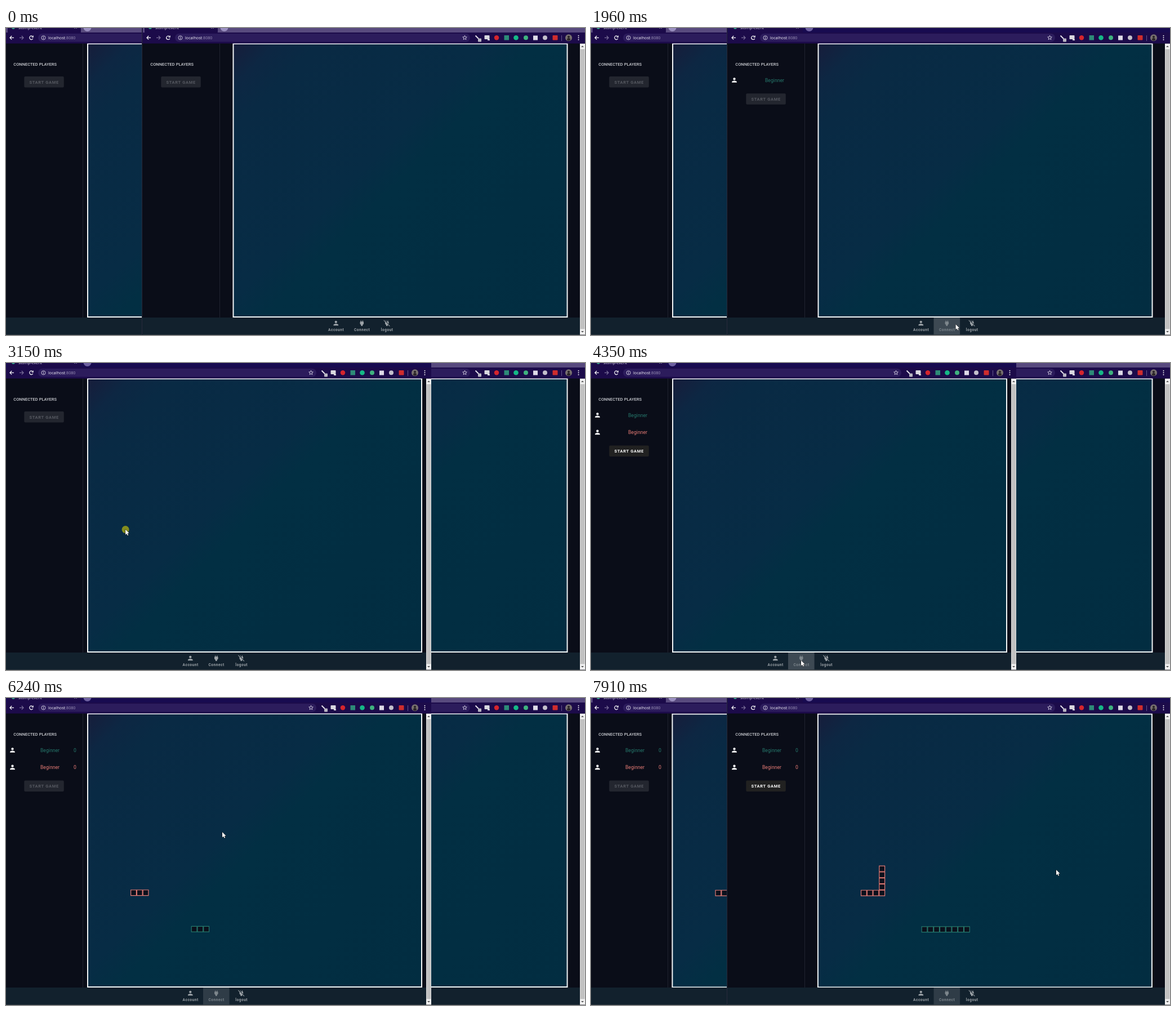
These frames come from a looping animation (1028 px wide and 545 px high, 7.99 s). An HTML page with a canvas:

```html
<!DOCTYPE html>
<html lang="en">
<head>
<meta charset="utf-8">
<title>Two player snake</title>
<style>
html, body { margin: 0; width: 100%; height: 100%; overflow: hidden; background: #0a0d18; }
canvas { display: block; }
</style>
</head>
<body>
<canvas id="stage" width="1028" height="545"></canvas>
<script>
const ctx = document.getElementById('stage').getContext('2d');
const LOOP = 7990;
const UI = 'Roboto, sans-serif';
const GREEN = '#26786c', RED = '#e57b75';
const CELL = 10.76;

const T = {
  focusRight: 430, joinRight: 1640, focusLeft: 3070, joinLeft: 4110,
  start: 5600, play: 5760, reflow: 6750, refocus: 7630
};

// Pointer path: time, x, y of the tip
const PATH = [
  [70, 1022, 330], [430, 760, 345], [550, 755, 347], [870, 676, 391], [1340, 647, 526],
  [1960, 647.5, 526], [2600, 358, 287], [2750, 356, 287], [3070, 212, 295], [3470, 213, 300],
  [3900, 373, 528], [4350, 373, 528], [4480, 394, 440], [4740, 295, 222], [4890, 294, 222],
  [5440, 72, 153], [5690, 72, 153], [5920, 369, 226], [6080, 371, 226], [6240, 384, 238],
  [6400, 384, 238], [6550, 401, 240], [6710, 403, 240], [7430, 823, 287], [7510, 839, 288],
  [7680, 839, 288], [7910, 826, 305], [7990, 826, 305]
];
const CLICKS = [430, 1570, 3070, 3950, 5500, 7560];

const ICONS = {
  person: new Path2D('M12 4a4 4 0 0 1 0 8a4 4 0 0 1 0-8m0 10c4.42 0 8 1.79 8 4v2H4v-2c0-2.21 3.58-4 8-4z'),
  plug: new Path2D('M16 7V3h-2v4h-4V3H8v4C7 7 6 8 6 9v5.5L9.5 18v3h5v-3l3.5-3.5V9c0-1-1-2-2-2z'),
  unplug: new Path2D('M20.84 22.73L15.31 17.2 14.5 18v3h-5v-3L6 14.5V9c0-.3.1-.61.25-.91L1.11 3l1.28-1.27 19.73 19.73zM18 14.5V9c0-1-1-2-2-2V3h-2v4h-3.8l7.6 7.6zM10 3H8v1.8l2 2z')
};
const ARROW = new Path2D('M0 0V9.4L2.2 7.4 3.7 10.8 5.2 10.1 3.7 6.8H6.7z');

function rect(x, y, w, h, color) {
  ctx.fillStyle = color;
  ctx.fillRect(x, y, w, h);
}

function pill(x, y, w, h, r, color) {
  ctx.fillStyle = color;
  ctx.beginPath();
  ctx.roundRect(x, y, w, h, r);
  ctx.fill();
}

function disc(x, y, r, color) {
  ctx.fillStyle = color;
  ctx.beginPath();
  ctx.arc(x, y, r, 0, 7);
  ctx.fill();
}

function line(points, color, width = 1.2) {
  ctx.strokeStyle = color;
  ctx.lineWidth = width;
  ctx.beginPath();
  points.forEach(([x, y]) => ctx.lineTo(x, y));
  ctx.stroke();
}

function text(str, x, y, font, color, { align = 'left', gap = 0 } = {}) {
  ctx.font = font;
  ctx.fillStyle = color;
  ctx.textAlign = align;
  ctx.textBaseline = 'alphabetic';
  ctx.letterSpacing = gap + 'px';
  ctx.fillText(str, x, y);
}

function icon(name, x, y, color, size = 13) {
  ctx.save();
  ctx.translate(x - size / 2, y - size / 2);
  ctx.scale(size / 24, size / 24);
  ctx.fillStyle = color;
  ctx.fill(ICONS[name]);
  ctx.restore();
}

function arrow(x, y, dir, color) {
  line([[x - 3.5, y], [x + 3.5, y]], color);
  line([[x + dir * .3, y - 3.3], [x + dir * 3.5, y], [x + dir * .3, y + 3.3]], color);
}

function star(x, y) {
  const pts = [];
  for (let i = 0; i <= 10; i++) {
    const a = i * Math.PI / 5 - Math.PI / 2, r = i % 2 ? 1.8 : 4;
    pts.push([x + r * Math.cos(a), y + r * Math.sin(a)]);
  }
  line(pts, '#d8d4e6', .9);
}

function tabStrip(x, right, focused) {
  rect(x, 0, right - x, 8, focused ? '#180b50' : '#584a7e');
  pill(x + 3, -8, 130, 18, 4, '#1c0b4a');
  disc(x + 13, -1, 3, '#35a58c');
  text('stomp-client', x + 22, 1.6, '7.2px "Open Sans", sans-serif', '#e4e1ee');
  line([[x + 121.5, -3], [x + 125.5, 1]], '#c8c3da', 1);
  line([[x + 125.5, -3], [x + 121.5, 1]], '#c8c3da', 1);
  disc(x + 144.5, -1, 7, focused ? '#6d60a0' : '#9a8fc0');
}

function toolbar(x, right) {
  rect(x, 8, right - x, 19.5, '#1c0b4a');
  arrow(x + 10.5, 17.3, -1, '#fff');
  arrow(x + 27.5, 17.3, 1, '#7d729c');
  ctx.strokeStyle = '#fff';
  ctx.lineWidth = 1.2;
  ctx.beginPath();
  ctx.arc(x + 45, 17.3, 3.2, .5, 5.4);
  ctx.stroke();
  line([[x + 45.5, 16.2], [x + 48.2, 16.2], [x + 48.2, 13.4]], '#fff');

  pill(x + 57, 10, right - x - 261, 14.5, 7.2, '#2c1c5c');
  ctx.strokeStyle = '#dcd8e8';
  ctx.lineWidth = .9;
  ctx.beginPath();
  ctx.arc(x + 66.5, 17.3, 3.5, 0, 7);
  ctx.stroke();
  rect(x + 66, 16.7, 1, 2.7, '#dcd8e8');
  rect(x + 66, 15, 1, 1, '#dcd8e8');
  const font = '7.2px "Open Sans", sans-serif';
  text('localhost', x + 75, 20, font, '#f4f2fa');
  text(':8080', x + 75 + ctx.measureText('localhost').width, 20, font, '#9c93b8');

  star(right - 213.5, 17.3);
  line([[right - 194.5, 13.5], [right - 189, 19]], '#e8e6ee', 1.8);
  pill(right - 190, 18.5, 6, 6, 1, '#b9b7c2');
  pill(right - 178.5, 13, 9, 7, 1, '#d9d8e0');
  rect(right - 173, 20, 4, 2, '#d9d8e0');
  disc(right - 157, 17.3, 4.2, '#d5252d');
  pill(right - 143.5, 13, 8.5, 8.5, 0, '#2d8b78');
  disc(right - 122.5, 17.3, 4.3, '#15b886');
  disc(right - 105, 17.3, 4, '#3fb27f');
  pill(right - 92, 13.5, 8, 8, 0, '#dedbe8');
  disc(right - 71, 17.3, 4, '#c4c0cc');
  pill(right - 57.5, 13, 9, 8.5, 1, '#cf2d2d');
  rect(right - 42, 13, 1, 10, '#65588c');
  disc(right - 29, 17.3, 6, '#77706f');
  disc(right - 29, 15.8, 2.1, '#2b2529');
  pill(right - 32, 18, 6, 4.5, 2.5, '#2b2529');
  [13.8, 17.3, 20.8].forEach(y => disc(right - 11.5, y, .95, '#fff'));
}

function scrollbar(x) {
  rect(x, 27.5, 9, 517, '#f1f1f1');
  rect(x + .6, 37.5, 7.8, 497, '#c1c1c1');
  [[33, 1], [539, -1]].forEach(([y, d]) => {
    ctx.fillStyle = '#505050';
    ctx.beginPath();
    ctx.moveTo(x + 4.5, y - d * 1.5);
    ctx.lineTo(x + 7, y + d);
    ctx.lineTo(x + 2, y + d);
    ctx.fill();
  });
}

function sidebar(x, s) {
  rect(x + 136, 27.5, 1, 487, '#20232f');
  text('CONNECTED PLAYERS', x + 13.3, 67, '500 7.5px ' + UI, '#c9cbd0');
  [GREEN, RED].slice(0, s.players).forEach((color, i) => {
    const y = 92.5 + 30.4 * i;
    icon('person', x + 11.5, y, '#fff');
    text('Beginner', x + (s.playing ? 61 : 66), y + 3.2, '8.64px ' + UI, color);
    if (s.playing) text('0', x + 120, y + 3.2, '8.64px ' + UI, color);
  });
  const y = 86 + 30.3 * s.players;
  pill(x + 32.3, y, 70.5, 19.4, 2, s.ready ? '#212121' : '#23262f');
  text('START GAME', x + 41.5, y + 12.5, '700 7.45px ' + UI, s.ready ? '#fff' : '#575a62', { gap: .68 });
}

function cellAt(col, row, color) {
  ctx.fillStyle = '#0b101c';
  ctx.strokeStyle = color;
  ctx.lineWidth = 1.2;
  ctx.beginPath();
  ctx.rect(col * CELL + .5, row * CELL + .5, 9.8, 9.8);
  ctx.fill();
  ctx.stroke();
}

function board(x, t) {
  const moved = t >= T.reflow;
  ctx.save();
  ctx.translate(x - (moved ? .6 : 0), moved ? 28.5 : 28);
  // 45 degree blend across a 593 x 485 box
  const g = ctx.createLinearGradient(0, 0, 539, 539);
  g.addColorStop(0, '#171d3b');
  g.addColorStop(.07, '#0d2743');
  g.addColorStop(.14, '#092a44');
  g.addColorStop(.42, '#072c45');
  g.addColorStop(.5, '#022f43');
  g.addColorStop(1, '#022d41');
  ctx.fillStyle = g;
  ctx.fillRect(0, 0, 593, 485);
  ctx.strokeStyle = '#f4f6f7';
  ctx.lineWidth = 2;
  ctx.strokeRect(0, 0, 593, 485);
  if (t >= T.play) {
    ctx.translate(.8, .2);
    const count = 1 + Math.floor((t - 5530) / 315);
    for (let i = 0; i < count; i++) {
      cellAt(7 + Math.min(i, 3), 29 - Math.max(i - 3, 0), RED);
      cellAt(17 + i, 35, GREEN);
    }
  }
  ctx.restore();
}

function footer(x, right, mid, glow) {
  rect(x, 514, right - x, 31, '#12212d');
  rect(x, 544, right - x, 1, '#2a343c');
  if (glow) rect(mid - 23.3, 514, 46.6, 30, `rgba(255,255,255,${glow})`);
  [['person', 'Account', -46], ['plug', 'Connect', 0], ['unplug', 'logout', 44.5]].forEach(([name, label, dx], i) => {
    const color = i === 1 && glow ? '#7d868c' : '#9da3a8';
    icon(name, mid + dx, 524, color);
    text(label, mid + dx + .3, 538.3, '700 6.5px ' + UI, color, { align: 'center', gap: .55 });
  });
}

function browser(s, t) {
  const { x, right, mid } = s;
  rect(x, 0, right - x, 545, '#0a0d18');
  sidebar(x, s);
  board(mid - 228.3, t);
  footer(x, right - 9, mid, s.glow);
  scrollbar(right - 9);
  tabStrip(x, right, s.focused);
  toolbar(x, right);
}

function pointerAt(t) {
  const i = PATH.findIndex(p => p[0] > t);
  if (i < 1) return null;
  const [t0, x0, y0] = PATH[i - 1], [t1, x1, y1] = PATH[i];
  const u = (t - t0) / (t1 - t0), k = u * u * (3 - 2 * u);
  return [x0 + (x1 - x0) * k, y0 + (y1 - y0) * k];
}

function pointer(p, t) {
  if (!p) return;
  if (CLICKS.some(c => t >= c && t < c + 160)) disc(p[0], p[1], 6.5, 'rgba(222,212,0,.58)');
  ctx.save();
  ctx.translate(...p);
  ctx.strokeStyle = '#000';
  ctx.lineWidth = 1;
  ctx.stroke(ARROW);
  ctx.fillStyle = '#fff';
  ctx.fill(ARROW);
  ctx.restore();
}

function draw(t) {
  const p = pointerAt(t);
  const leftOnTop = t >= T.focusLeft && t < T.refocus;
  const playing = t >= T.play;
  const glowFor = (mid, active, used) => {
    const over = active && p && p[1] > 514 && Math.abs(p[0] - mid) < 23.3;
    return (used ? .12 : 0) + (over ? (used ? .06 : .04) : 0);
  };
  const left = {
    x: 0, right: 755, mid: 373.3, playing, focused: leftOnTop,
    players: t >= T.joinLeft ? 2 : 0,
    ready: t >= T.joinLeft && t < T.start,
    glow: glowFor(373.3, leftOnTop, t >= 3950)
  };
  const right = {
    x: 243, right: 1028, mid: 631.8, playing, focused: !leftOnTop && t >= T.focusRight,
    players: t >= T.joinLeft ? 2 : t >= T.joinRight ? 1 : 0,
    ready: t >= T.joinLeft,
    glow: glowFor(631.8, !leftOnTop, t >= 1570)
  };
  const drawRight = () => {
    rect(241, 0, 2, 545, '#0a0d18');
    rect(241, 514, 2, 31, '#12212d');
    rect(241, 0, 2, 27.5, '#1c0b4a');
    browser(right, t);
    rect(241, 0, 1, 545, '#272a3c');
  };
  if (leftOnTop) {
    drawRight();
    browser(left, t);
  } else {
    browser(left, t);
    drawRight();
  }
  pointer(p, t);
}

function tick(now) {
  draw(now % LOOP);
  requestAnimationFrame(tick);
}
requestAnimationFrame(tick);
</script>
</body>
</html>
```
